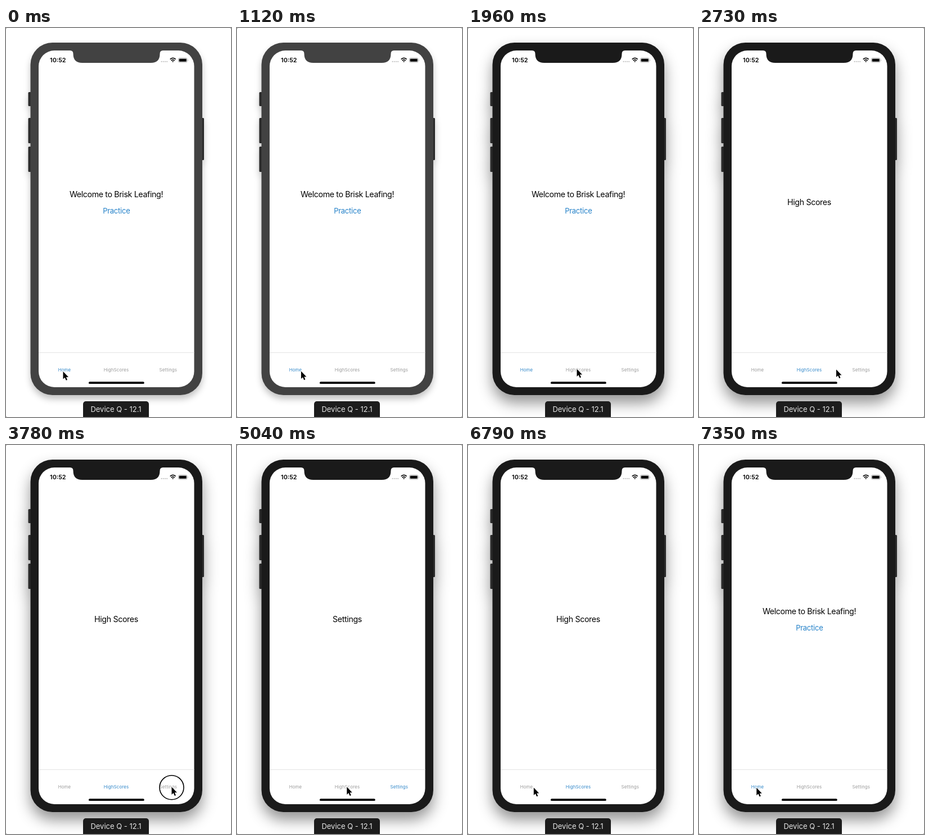
Recreate the animation shown at these times as an HTML page. Size 400x692 px, loop 8.54 s.

```html
<!DOCTYPE html>
<html lang="en">
<head>
<meta charset="utf-8">
<title>Tab navigation demo</title>
<style>
  html, body { margin: 0; width: 100%; height: 100%; overflow: hidden; background: #777; }
  svg { display: block; width: 400px; height: 692px; background: #fff; border-radius: 2px;
        font-family: Inter, "Liberation Sans", sans-serif; text-anchor: middle; }
  #phone { color: #424242; filter: drop-shadow(0 7px 6px rgba(0, 0, 0, .24)); }
  #phone.focused { color: #1a1a1a; filter: drop-shadow(0 14px 13px rgba(0, 0, 0, .42)); }
  .heading { font-size: 14.2px; letter-spacing: -.35px; }
  .link { font-size: 13px; letter-spacing: -.25px; fill: #2380c8; }
  .tab { font-size: 7.8px; letter-spacing: .2px; fill: #999; }
  .tab.active { fill: #2f86c8; }
</style>
</head>
<body>
<svg viewBox="0 0 400 692">
  <g id="phone">
    <path fill="#2b2b2b" d="M41 114h5v25h-5q-1.500 0-1.500-1.500v-22q0-1.500 1.500-1.500zM41 160h5v45h-5q-1.500 0-1.500-1.500v-42q0-1.500 1.500-1.500zM41 211h5v45h-5q-1.500 0-1.500-1.500v-42q0-1.500 1.500-1.500zM346 160h4.500q1.500 0 1.500 1.500v72q0 1.500-1.500 1.500h-4.500z"/>
    <rect x="43.500" y="26" width="305.500" height="627" rx="39" fill="currentColor"/>
    <rect x="58" y="40" width="276.500" height="599" rx="28" fill="#fff"/>
    <path fill="currentColor" d="M114 39v1q5.500 0 5.500 6q0 16 16 16h122q16 0 16-16q0-6 5.500-6v-1z"/>
  </g>

  <text x="92.300" y="61" font-size="10.800" font-weight="600">10:52</text>
  <g fill="#b5b5b5">
    <circle cx="276.500" cy="59.700" r="1"/><circle cx="279.700" cy="59.700" r="1"/>
    <circle cx="282.900" cy="59.700" r="1"/><circle cx="286.100" cy="59.700" r="1"/>
  </g>
  <g fill="none" stroke="#000" stroke-width="1.700">
    <path d="M291.700 55.700q5-4.600 10 0M293.700 58q3-2.700 6 0"/>
    <path d="M296.700 61l-1.500-1.700q1.500-1.200 3 0z" fill="#000" stroke="none"/>
  </g>
  <rect x="306.500" y="53.500" width="15.500" height="7.500" rx="2" fill="none" stroke="#999" stroke-width=".8"/>
  <rect x="307.700" y="54.700" width="13.100" height="5.100" rx="1"/>
  <path d="M323 55.700q1.600 1.500 0 3z" fill="#999"/>

  <g class="screen">
    <text class="heading" x="196" y="300.500">Welcome to Brisk Leafing!</text>
    <text class="link" x="196.300" y="330">Practice</text>
  </g>
  <text class="screen heading" x="196" y="314.500">High Scores</text>
  <text class="screen heading" x="196" y="314.500">Settings</text>

  <path d="M58 577.500h276.500" stroke="#e4e4e4"/>
  <text class="tab" x="104" y="610.700">Home</text>
  <text class="tab" x="196" y="610.700">HighScores</text>
  <text class="tab" x="288.300" y="610.700">Settings</text>
  <rect x="147" y="629.300" width="98.700" height="3.800" rx="1.900"/>

  <rect x="137" y="664" width="117" height="34" rx="5" fill="#1c1c1c"/>
  <text x="195.500" y="683.300" font-size="13" fill="#e6e6e6">Device Q - 12.1</text>

  <g id="pointer">
    <circle id="ring" cy="1" r="21.500" fill="none" stroke="#000" stroke-width="1.600"/>
    <path d="M0 0V13.600L3.100 10.800 5.300 15.800 7.500 14.900 5.400 10H9.500Z"
          stroke="#fff" stroke-width="1.600" paint-order="stroke"/>
  </g>
</svg>
<script>
  const LOOP = 8540, STEP = 70, FOCUS_AT = 1960;
  const HOME = 0, SCORES = 1, SETTINGS = 2;
  const start = [101.5, 611];
  const moves = [
    { from: 910, to: 1820, end: [193.5, 606.5] },
    { from: 2380, to: 3080, end: [294.5, 608.3] },
    { from: 4060, to: 4760, end: [195, 607.5] },
    { from: 4970, to: 5040, end: [195.3, 608.3] },
    { from: 6160, to: 7000, end: [102.3, 609.7] }
  ];
  const presses = [3780, 5530, 7280];
  const visits = [[0, HOME], [2030, SCORES], [3920, SETTINGS], [5600, SCORES], [7350, HOME]];

  const phone = document.getElementById("phone");
  const pointer = document.getElementById("pointer");
  const ring = document.getElementById("ring");
  const screens = document.querySelectorAll(".screen");
  const tabs = document.querySelectorAll(".tab");
  const smooth = p => p * p * (3 - 2 * p);

  function pointerAt(t) {
    let pos = start;
    for (const { from, to, end } of moves) {
      const p = smooth(Math.min(1, Math.max(0, (t - from) / (to - from))));
      pos = pos.map((v, i) => v + (end[i] - v) * p);
    }
    return pos;
  }

  function draw(now) {
    const t = Math.floor((now % LOOP) / STEP) * STEP;
    const current = visits.filter(([at]) => at <= t).pop()[1];
    screens.forEach((el, i) => el.style.display = i === current ? "" : "none");
    tabs.forEach((el, i) => el.classList.toggle("active", i === current));
    phone.classList.toggle("focused", t >= FOCUS_AT);
    pointer.setAttribute("transform", `translate(${pointerAt(t)})`);
    ring.style.display = presses.includes(t) ? "" : "none";
  }

  let origin;
  function tick(now) {
    origin ??= now;
    draw(now - origin);
    requestAnimationFrame(tick);
  }
  draw(0);
  requestAnimationFrame(tick);
</script>
</body>
</html>
```
